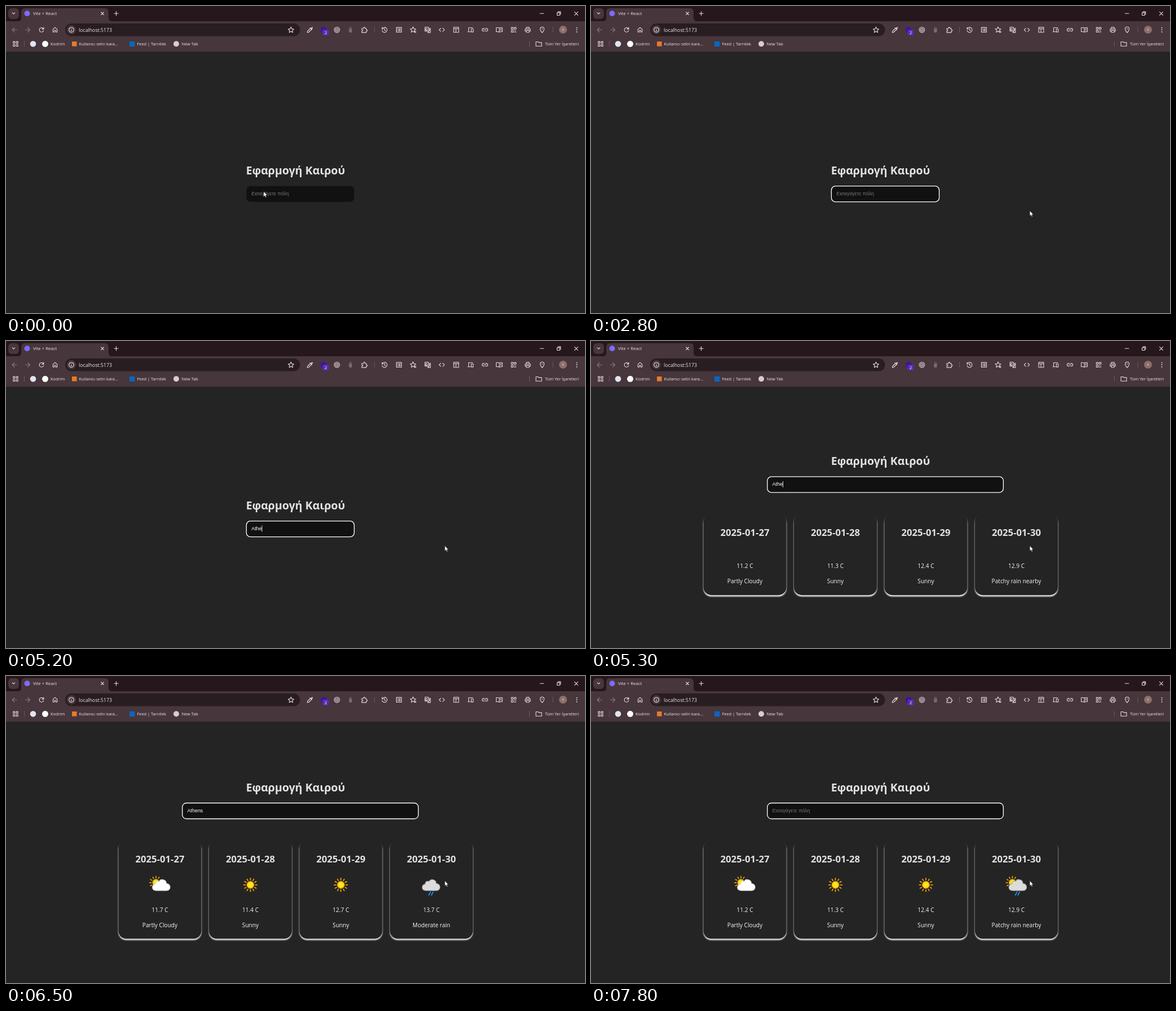
Write an HTML page that moves like this. It is 1027 by 545 pixels and loops after 8000 ms.

```html
<!DOCTYPE html>
<html lang="el">
<head>
<meta charset="utf-8">
<title>Vite + React</title>
<style>
html, body { margin: 0; width: 100%; height: 100%; overflow: hidden; background: #242424; }
svg { display: block; width: 100%; height: 100%; }
text { font-family: "Open Sans", "Noto Sans", sans-serif; fill: #e3e3e3; white-space: pre; }
.ui { font-size: 7.4px; fill: #f0e4e8; }
.field { font-family: "Liberation Sans", Arial, sans-serif; font-size: 8.92px; }
.mid { text-anchor: middle; }
.body { font-size: 10.15px; fill: #f8f8f8; }
.date { font-size: 16.7px; font-weight: 700; }
.line { fill: none; stroke: #e6d9dd; stroke-width: 1.1; stroke-linecap: round; stroke-linejoin: round; }
.dim { stroke: #8e7d83; }
.solid { fill: #e6d9dd; stroke: none; }
</style>
</head>
<body>
<svg id="stage" viewBox="0 0 1027 545">
  <defs>
    <filter id="glow" x="-10%" y="-10%" width="120%" height="120%"><feGaussianBlur stdDeviation="1"/></filter>
    <radialGradient id="sunFill"><stop offset=".45" stop-color="#ffe81c"/><stop offset="1" stop-color="#fdc00a"/></radialGradient>
  </defs>
  <rect width="1027" height="545" fill="#242424"/>
  <g id="chrome">
    <rect width="1027" height="30" fill="#25171b"/>
    <rect y="27" width="1027" height="54" fill="#47363b"/>
    <path d="M21 27Q27 27 27 21V11Q27 4 34 4H175Q182 4 182 11V21Q182 27 188 27Z" fill="#47363b"/>
    <rect x="4" y="4" width="19" height="19" rx="6" fill="#47363b"/>
    <circle cx="37.5" cy="13.3" r="5" fill="#7d6bff"/>
    <text class="ui" x="48" y="16.4" style="font-size:7.8px">Vite + React</text>
    <rect x="105" y="31" width="416.5" height="22.5" rx="11.2" fill="#281d20"/>
    <circle cx="116" cy="42.3" r="8.2" fill="#47363b"/>
    <text class="ui" x="129" y="45.6" style="font-size:8.75px">localhost:5173</text>
    <circle cx="563.5" cy="42.5" r="5.3" fill="#3d12a6"/>
    <rect x="561.5" y="41.8" width="11" height="10.4" rx="2.5" fill="#5b2bb5"/>
    <text class="ui mid" x="567.2" y="49.8" style="fill:#fff">2</text>
    <circle cx="988" cy="42" r="7" fill="#8d6e68"/>
    <text class="ui mid" x="988" y="44.4">s</text>
    <g fill="#6b585f"><path d="M32 62h1v10h-1zM653 37h1v10h-1zM969.5 37h1v10h-1zM928 62h1v10h-1z"/></g>
    <circle cx="48" cy="67.3" r="5.3" fill="#dfe5f5"/>
    <circle cx="69.5" cy="67.3" r="5.5" fill="#fff"/>
    <rect x="117" y="63" width="8.5" height="8.5" fill="#e87a28"/>
    <rect x="219" y="62.7" width="9.4" height="9.4" rx="1" fill="#0a66c2"/>
    <circle cx="302" cy="67.3" r="5" fill="#d8ccd0"/>
    <text class="ui" x="79" y="70">Kodrim</text>
    <text class="ui" x="129.5" y="70">Kullanıcı selin kara...</text>
    <text class="ui" x="232.5" y="70">Feed | Tarnilek</text>
    <text class="ui" x="311.5" y="70">New Tab</text>
    <text class="ui" x="956" y="70">Tüm Yer İşaretleri</text>
  </g>
  <g id="page">
    <g id="head">
      <text class="mid" x="513.5" y="299.2" style="font-size:19.6px;font-weight:700">Εφαρμογή Καιρού</text>
      <rect id="box" y="319.7" height="28" rx="7.2" fill="#111" stroke-width="1.34"/>
      <text id="entry" class="field" y="336.3"></text>
      <rect id="caret" y="327.7" width="0.9" height="10.8" fill="#fff"/>
    </g>
    <g id="cards"></g>
  </g>
  <path id="pointer" d="M0 0V9.2L2 7.3L3.5 10.6L5 9.9L3.6 6.7H6.3Z" fill="#fff" stroke="#111" stroke-width=".5"/>
</svg>
<script>
const NS = "http://www.w3.org/2000/svg";
const LOOP = 8000, TICK = 100, BLINK = 530;
const $ = id => document.getElementById(id);

function add(parent, tag, attrs = {}, text = "") {
  const el = document.createElementNS(NS, tag);
  for (const key in attrs) el.setAttribute(key, attrs[key]);
  el.textContent = text;
  parent.append(el);
  return el;
}

// Toolbar icons, each drawn around its own centre: [x, y, path, extra class]
const STAR = "M0 -5L1.5 -1.7L5 -1.3L2.4 1.1L3.1 4.6L0 2.8L-3.1 4.6L-2.4 1.1L-5 -1.3L-1.5 -1.7Z";
const RING = "M-4.8 0a4.8 4.8 0 1 0 9.6 0a4.8 4.8 0 1 0 -9.6 0";
const icons = [
  [13.5, 13, "M-2.3 -1.2L0 1.2L2.3 -1.2"],
  [171, 13.3, "M-2.3 -2.3L2.3 2.3M2.3 -2.3L-2.3 2.3"],
  [195.5, 13.3, "M-3.6 0H3.6M0 -3.6V3.6"],
  [950.5, 13.3, "M-3.3 0H3.3"],
  [980.5, 13.3, "M-3 -1.4H1.6V3.2H-3ZM-1.4 -3.2H3.2V1.6"],
  [1011.5, 13.3, "M-3 -3L3 3M3 -3L-3 3"],
  [15, 42.3, "M4 0H-4M0 -4L-4 0L0 4", "dim"],
  [38.5, 42.3, "M-4 0H4M0 -4L4 0L0 4", "dim"],
  [63, 42.3, "M3.6 -1.4A3.9 3.9 0 1 0 3.7 1.3M3.9 -4.2V-1.2H.9"],
  [87, 42.3, "M-3.7 4V-1L0 -4.2L3.7 -1V4H1.2V.9H-1.2V4Z"],
  [116, 42.3, "M-4.3 0a4.3 4.3 0 1 0 8.6 0a4.3 4.3 0 1 0 -8.6 0M0 -.3V2.2M0 -2.1V-2"],
  [505.5, 42.3, STAR],
  [539, 42.5, "M-4.6 4.6L-4 2L1 -3L3 -1L-2 4ZM.2 -3.8L3.8 -.2M2 -2.5L4 -4.5L4.8 -3.7L2.8 -1.7"],
  [587, 42.3, RING + "M-2.5 0a2.5 2.5 0 1 0 5 0a2.5 2.5 0 1 0 -5 0M-.6 0H.6"],
  [611, 42.3, "M-1.6 -4H1.6M-2.2 -1.5H2.2L1.7 3.8H-1.7ZM-2 1H2M0 -1V3.4", "dim"],
  [635.5, 42.5, "M-4.4 -2.8H-1.2C-1.8 -5.6 1.8 -5.6 1.2 -2.8H3.6V-.2C6 -.8 6 2.6 3.6 2V4.6H-4.4V1.8C-2 2 -2 -.8 -4.4 -.4Z"],
  [671.5, 42.3, "M-4 -2A4.5 4.5 0 1 1 -4.4 1M-4.4 -4.2V-1.6H-1.8M0 -2.4V.4L2 1.6"],
  [697, 42.3, "M-4.5 -4.2H4.5V4.2H-4.5ZM-2.6 -1.8H-2.4M-.8 -1.8H2.6M-2.6 0H-2.4M-.8 0H2.6M-2.6 1.8H-2.4M-.8 1.8H2.6"],
  [722, 42, STAR + "M2.2 4.6H5.2M2.8 2.8H5.2"],
  [748, 42.3, "M-4.8 -4.8H1L2.4 2.4H-4.8ZM2 -2.8H4.8V4.8H0L2.2 2.4M-.6 -1.6A1.8 1.8 0 1 0 -.5 .2H-1.8M2.8 -.4H4M3.4 -.4L2.8 1.4"],
  [773, 42.3, "M-1.8 -2.9L-4.7 0L-1.8 2.9M1.8 -2.9L4.7 0L1.8 2.9"],
  [798.5, 42.3, "M-4.4 -4.4H4.4V4.4H-4.4ZM-4.4 -1.8H4.4M-.4 -1.8V4.4"],
  [824, 42.3, "M3.8 -3.8H-3.4V2.6M-4.8 3.4H.2M1.4 -1.6H4.8V3.8H1.4Z"],
  [849.5, 42.3, "M-1 -2.4H-2.6A2.4 2.4 0 0 0 -2.6 2.4H-1M1 -2.4H2.6A2.4 2.4 0 0 1 2.6 2.4H1M-1.9 0H1.9"],
  [875, 42.3, "M0 -3.2Q-2.6 -4.6 -5.4 -3.8V3.4Q-2.6 2.8 0 4.2Q2.6 2.8 5.4 3.4V-3.8Q2.6 -4.6 0 -3.2ZM0 -3.2V4.2M1.8 -1.6H3.6M1.8 .4H3.6"],
  [900.5, 42.3, "M-4.2 -4.2H-1V-1H-4.2ZM1 -4.2H4.2V-1H1ZM-4.2 1H-1V4.2H-4.2ZM1.2 1.4H2M3.8 1.4H4M2.6 2.8H2.8M1.2 4.1H2M3.8 4.1H4"],
  [925.5, 42.3, "M-2.5 -1.6V-4.4H2.5V-1.6M-2.5 2.4H-4.6V-1.6H4.6V2.4H2.5M-2.5 .8H2.5V4.4H-2.5Z"],
  [951, 42.3, "M0 5C-5.4 -.4 -3.8 -5 0 -5S5.4 -.4 0 5ZM-.7 -1.6H.7"],
  [945, 67.3, "M-5 -3.8H-1.4L0 -2.4H5V4H-5Z"],
  [17, 67.3, "M-4.2 -4.2H-1.2V-1.2H-4.2ZM1.2 -4.2H4.2V-1.2H1.2ZM-4.2 1.2H-1.2V4.2H-4.2ZM1.2 1.2H4.2V4.2H1.2Z"]
];
for (const [x, y, d, extra = ""] of icons)
  add($("chrome"), "path", { d, class: "line " + extra, transform: `translate(${x} ${y})` });
for (const dy of [-3.6, 0, 3.6])
  add($("chrome"), "circle", { cx: 1012.5, cy: 42.3 + dy, r: 1, class: "solid" });

// Weather symbols
const CLOUD = "M-9 10C-17.5 10 -18 0 -10.5 -1.5C-10.5 -6.5 -6 -7.5 -4 -6C-1 -11.5 9 -10.5 9 -2.5C17.5 -2.5 18 10 9 10Z";

function sun(parent, x, y, scale) {
  const g = add(parent, "g", { transform: `translate(${x} ${y}) scale(${scale})` });
  for (let a = 0; a < 360; a += 30)
    add(g, "path", { d: "M0 -8.8V-11.8", stroke: "#e9a00c", "stroke-width": 1.8, "stroke-linecap": "round", transform: `rotate(${a})` });
  add(g, "circle", { r: 6.4, fill: "url(#sunFill)", stroke: "#e9a00c", "stroke-width": .8 });
}

function cloud(parent, x, fill, stroke) {
  add(parent, "path", { d: CLOUD, fill, stroke, "stroke-width": 1.1, transform: `translate(${x} .7)` });
}

function drops(parent, x) {
  for (const dx of [0, 4.6])
    add(parent, "path", { d: `M${x + dx + 2.8} 13.3L${x + dx} 18.6`, stroke: "#2389e4", "stroke-width": 2, "stroke-linecap": "round" });
}

const symbols = {
  sunny: g => sun(g, 0, .5, 1),
  partly: g => { sun(g, -7, -3.5, .95); cloud(g, 2.5, "#fff", "#d5d5d5"); },
  patchy: g => { sun(g, -7, -3.5, .95); cloud(g, 2.5, "#dcdcdc", "#a9a9a9"); drops(g, -1.8); },
  rain: g => { cloud(g, -.4, "#dcdcdc", "#a9a9a9"); drops(g, -4.4); }
};

// Forecast cards
const CARD_H = 174.5, ICON_H = 30.6;
const cards = [27, 28, 29, 30].map((day, i) => {
  const g = add($("cards"), "g", { transform: `translate(${273 + i * 160.5} 0)` });
  const panel = { x: -73.5, width: 147, rx: 14 };
  const frame = [
    add(g, "rect", { ...panel, y: 294.3, fill: "#fff", filter: "url(#glow)" }),
    add(g, "rect", { ...panel, y: 292, fill: "#242424" })
  ];
  add(g, "text", { class: "date mid", y: 330.9 }, "2025-01-" + day);
  const icon = {};
  for (const name of [["partly"], ["sunny"], ["sunny"], ["patchy", "rain"]][i])
    symbols[name](icon[name] = add(g, "g", { transform: "translate(0 370.3)" }));
  const low = add(g, "g");
  const temp = add(low, "text", { class: "body mid", y: 418.8 });
  const sky = add(low, "text", { class: "body mid", y: 445.6 });
  return { frame, icon, low, temp, sky };
});

// Timelines: [start, value]
const typed = [[0, ""], [3700, "A"], [4000, "At"], [4300, "Ath"], [4900, "Athe"],
  [5500, "Athen"], [5700, "Athens"], [7000, "Ath"], [7100, ""]];
const early = { temps: [11.2, 11.3, 12.4, 12.9], last: "Patchy rain nearby" };
const late = { temps: [11.7, 11.4, 12.7, 13.7], last: "Moderate rain" };
const results = [[0, null], [5300, early], [5400, late], [7600, early]];
const lastIcon = [[0, ""], [5400, "patchy"], [6500, "rain"], [7700, "patchy"]];
const FOCUS = 100, MOVE = [100, 600], BLINK_FROM = 1200;

const step = (track, t) => track.findLast(([start]) => start <= t);
const show = (el, on) => el.setAttribute("visibility", on ? "visible" : "hidden");
const bend = (a, b, c, p) => (1 - p) ** 2 * a + 2 * p * (1 - p) * b + p * p * c;

function drawInput(t, wide) {
  const focused = t >= FOCUS;
  const left = wide ? 312.8 : 426.4;
  $("box").setAttribute("x", left);
  $("box").setAttribute("width", wide ? 418.6 : 191.2);
  $("box").setAttribute("stroke", focused ? "#fff" : "none");

  const [since, value] = step(typed, t);
  const entry = $("entry");
  entry.setAttribute("x", left + 8.8);
  entry.textContent = value || "Εισαγάγετε πόλη";
  entry.style.fill = value ? "#fff" : "#757575";
  const offset = value ? entry.getComputedTextLength() : 0;
  $("caret").setAttribute("x", left + 8.8 + offset);
  const phase = Math.max(0, t - Math.max(since, BLINK_FROM));
  show($("caret"), focused && Math.floor(phase / BLINK) % 2 === 0);
}

function drawCards(data, symbol) {
  $("cards").style.display = data ? "" : "none";
  if (!data) return;
  const fold = symbol ? 0 : ICON_H;
  $("cards").setAttribute("transform", `translate(0 ${fold / 2})`);
  cards.forEach((card, i) => {
    card.frame.forEach(r => r.setAttribute("height", CARD_H - fold));
    card.low.setAttribute("transform", `translate(0 ${-fold})`);
    card.temp.textContent = data.temps[i].toFixed(1) + " C";
    card.sky.textContent = ["Partly Cloudy", "Sunny", "Sunny", data.last][i];
    for (const name in card.icon) show(card.icon[name], symbol && (i < 3 || name === symbol));
  });
}

function render(ms) {
  const t = Math.floor(ms / TICK) * TICK;
  const data = step(results, t)[1];
  const symbol = step(lastIcon, t)[1];
  const lift = !data ? 0 : symbol ? 94.2 : 78.8;
  $("head").setAttribute("transform", `translate(0 ${-lift})`);
  drawInput(t, !!data);
  drawCards(data, symbol);

  const p = Math.min(1, Math.max(0, (t - MOVE[0]) / (MOVE[1] - MOVE[0])));
  const ease = p * p * (3 - 2 * p);
  $("pointer").setAttribute("transform",
    `translate(${bend(457, 640, 778.3, ease)} ${bend(329.3, 450, 363.5, ease)})`);
}

const begin = performance.now();
function loop() {
  render((performance.now() - begin) % LOOP);
  requestAnimationFrame(loop);
}
loop();
</script>
</body>
</html>
```
